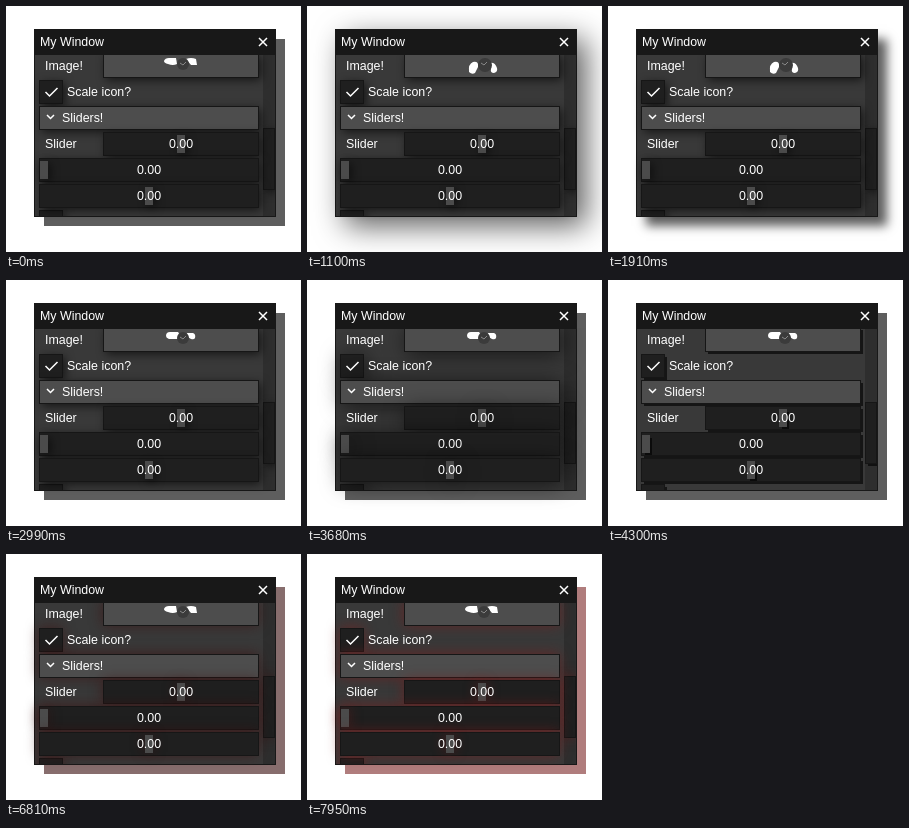
These frames come from a looping animation (295x246 px, 8000 ms). An HTML page:

```html
<!DOCTYPE html>
<html lang="en">
<head>
<meta charset="utf-8">
<title>Window shadows</title>
<style>
html, body { margin: 0; width: 100%; height: 100%; overflow: hidden; background: #fff; }
#stage { position: relative; width: 295px; height: 246px; overflow: hidden; font: 12.4px/24px "Liberation Sans", Arial, sans-serif; color: #fff; }
#stage div, svg { position: absolute; box-sizing: border-box; white-space: pre; }
#window { left: 28px; top: 23px; width: 242px; height: 188px; background: #393939; border: 1px solid #181818; }
#title { left: 28px; top: 23px; width: 242px; height: 26px; background: #181818; }
#track { left: 257px; top: 49px; width: 12px; height: 161px; background: #2e2e2e; }
#body, #clipped { inset: 0; clip-path: polygon(0 48px, 295px 48px, 295px 246px, 0 246px); }
#clipped { clip-path: inset(48px 26px 36px 29px); }
.box { background: #1f1f1f; border: 1px solid #161616; text-align: center; }
.light { background: #4d4d4d; }
.grab { background: #4b4b4b; top: 2px; bottom: 2px; width: 8px; }
#stage .value { inset: -1px 0 0; }
svg { left: 0; top: 0; fill: none; stroke: #fff; stroke-width: 1.5; }
</style>
</head>
<body>
<div id="stage">
  <div id="window"></div>
  <div id="clipped"><div id="track"></div></div>
  <div id="body"></div>
  <div id="title"></div>
  <svg width="295" height="246">
    <path d="M253 32l8 8m0-8l-8 8M39.5 86l4 4 8-8M41 109l3.5 3.5 3.5-3.5"/>
    <g id="icon" stroke="none">
      <g><path fill="#fff" d="M158 55q1-3 5-3h7l1 6q-4 2-9 0-4-1-4-3M180 53q5-2 10 0l1 6h-6z"/><circle cx="177" cy="58" r="6" fill="#3b3b3b"/></g>
      <g><path fill="#fff" d="M162 66q-1-8 4-10 6-1 5 5l-3 6q-3 2-6-1M183 57q5-1 7 5 1 4-3 5-4 0-3-4z"/><circle cx="178" cy="59" r="7" fill="#3b3b3b"/></g>
      <g><path fill="#fff" d="M160 56q0-4 4-4h8q3 3 0 7h-9q-3-1-3-3M181 53h6q3 1 2 5-1 2-4 1l-5-3z"/><circle cx="177" cy="58" r="6" fill="#3b3b3b"/></g>
      <path d="M174 57l3 2 3-3" stroke="#888" stroke-width="1"/>
    </g>
  </svg>
</div>
<script>
const LOOP = 8000;
const byId = id => document.getElementById(id);
const stage = byId('stage'), body = byId('body'), clipped = byId('clipped');
const widgets = [];

function add(parent, cls, css, text = '') {
  const el = document.createElement('div');
  el.className = cls;
  el.textContent = text;
  Object.assign(el.style, css);
  return parent.appendChild(el);
}
const label = (x, baseline, text) =>
  add(stage, '', { left: x + 'px', top: baseline - 16 + 'px' }, text);

function box(x, y, w, h, cls = '', parent = body) {
  const el = add(parent, 'box ' + cls, { left: x + 'px', top: y + 'px', width: w + 'px', height: h + 'px' });
  widgets.push(el);
  return el;
}
function slider(x, y, w, grabX) {
  const el = box(x, y, w, 24);
  widgets.push(add(el, 'grab', { left: grabX - x - 1 + 'px' }));
  add(el, 'value', {}, '0.00');
}

box(33, 204, 24, 24, '', clipped);
box(257, 122, 12, 62, '', clipped);
box(97, 47, 156, 25, 'light');
box(33, 74, 24, 24);
box(33, 100, 220, 24, 'light');
slider(97, 126, 156, 171);
slider(33, 152, 220, 34);
slider(33, 178, 220, 139);

label(34, 40, 'My Window');
label(39, 64, 'Image!');
label(61, 90, 'Scale icon?');
label(56, 116, 'Sliders!');
label(39, 142, 'Slider');

// Rows: time, offset, blur, colour, steps until the next row.
// The shadow is one pixel smaller than its box at the right and bottom.
function animateShadow(el, rows) {
  const frames = rows.map(([time, shift, blur, color, steps]) => ({
    offset: time / LOOP,
    boxShadow: `${shift - 0.5}px ${shift - 0.5}px ${blur}px -0.5px ${color}`,
    easing: steps ? `steps(${steps}, start)` : 'linear'
  }));
  el.animate(frames, { duration: LOOP, iterations: Infinity });
}

const dark = 'rgba(0, 0, 0, .63)';
const windowRed = 'rgba(130, 49, 49, .63)';
const widgetRed = 'rgba(125, 25, 25, .63)';

animateShadow(byId('window'), [
  [0, 10, 0, dark], [130, 10, 0, dark, 9], [1100, 10, 28, dark],
  [1300, 10, 28, dark, 2], [1500, 10, 32, dark, 4], [1910, 10, 11, dark, 4],
  [2320, 10, 6, dark], [2390, 10, 6, dark, 5], [2900, 10, 0, dark],
  [5950, 10, 0, dark, 8], [6810, 10, 0, 'rgba(65, 24, 24, .63)'],
  [6940, 10, 0, 'rgba(65, 24, 24, .63)', 10], [7950, 10, 0, windowRed], [8000, 10, 0, windowRed]
]);

for (const el of widgets) animateShadow(el, [
  [0, 3, 10, dark], [3470, 3, 10, dark, 4], [3850, 3, 25, dark, 5],
  [4300, 3, 0, dark], [4630, 3, 0, dark, 8], [5580, 0, 13, dark],
  [5950, 0, 13, dark, 8], [6810, 0, 13, 'rgba(62, 12, 12, .63)'],
  [6940, 0, 13, 'rgba(62, 12, 12, .63)', 10], [7950, 0, 13, widgetRed], [8000, 0, 13, widgetRed]
]);

// Each pose of the picture is visible in its own time spans
const spans = [[[0, 600], [4630, LOOP]], [[600, 2390]], [[2390, 4630]]];
const poses = document.querySelectorAll('#icon > g');
function showPose() {
  const time = performance.now() % LOOP;
  poses.forEach((pose, i) => {
    const visible = spans[i].some(([from, to]) => time >= from && time < to);
    pose.style.visibility = visible ? 'visible' : 'hidden';
  });
  requestAnimationFrame(showPose);
}
showPose();
</script>
</body>
</html>
```
